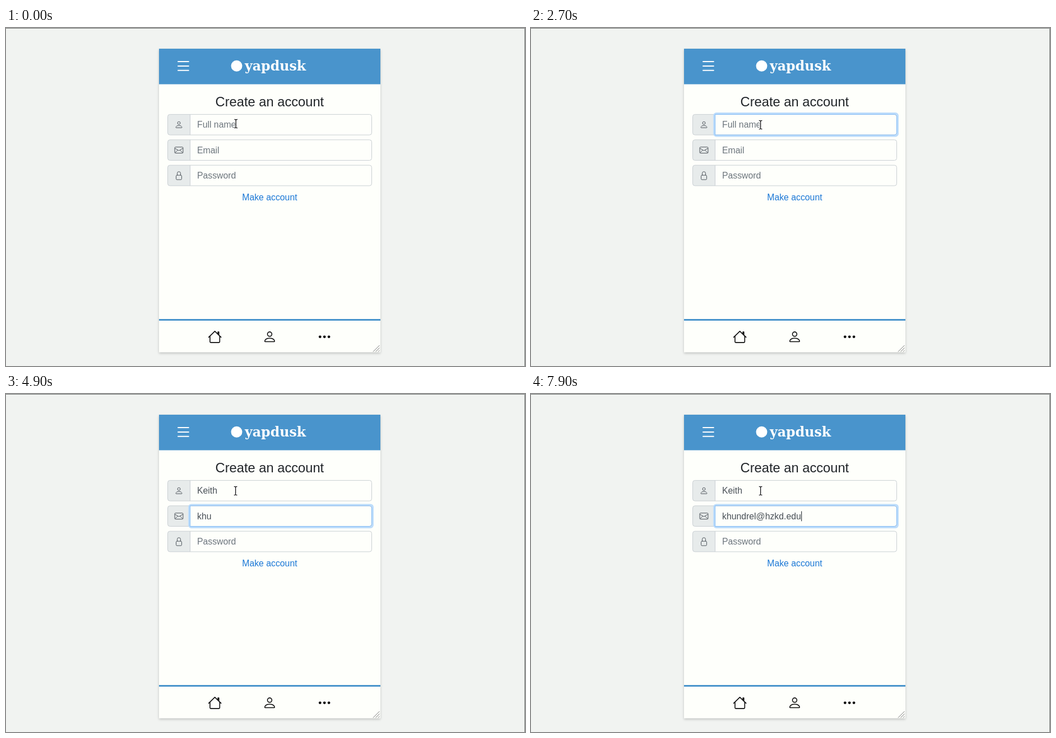
Animation, 926 px wide and 604 px high, one loop 8 s. Source, as an HTML page:

```html
<!DOCTYPE html>
<html lang="en">
<head>
<meta charset="utf-8">
<title>Create an account</title>
<style>
  html, body { margin: 0; width: 100%; height: 100%; overflow: hidden; background: #f1f3f1; }
  svg { display: block; }
  text { font: 15.8px "Liberation Sans", Arial, sans-serif; }
  .card { fill: #fefffb; filter: drop-shadow(0 2px 2px rgba(0, 0, 0, .2)); }
  .blue { fill: #4994cc; }
  .brand { font: bold 23.7px "DejaVu Serif", serif; fill: #fff; }
  .title { font-size: 23.7px; fill: #212529; }
  .link { fill: #1b78d6; }
  .mid { text-anchor: middle; }
  .line { fill: none; stroke-width: 1; stroke-linejoin: round; }
  .addon { fill: #e7ebeb; }
  .frame { fill: none; stroke: #c9cfd3; }
  .ring { fill: none; stroke: #bcdcfb; stroke-width: 3.2; }
  .edge { fill: none; stroke: #80b9f5; }
</style>
</head>
<body>
<svg width="926" height="604" viewBox="0 0 926 604">
  <defs>
    <g id="person" class="line">
      <circle cx="8" cy="5" r="2.5"/>
      <path d="M3 13.5h10q.5 0 .5-.5C13.5 12 12.5 9.5 8 9.5S2.5 12 2.5 13q0 .5 .5 .5z"/>
    </g>
    <g id="mail" class="line">
      <rect x=".5" y="2.5" width="15" height="11" rx="1.5"/>
      <path d="M.5 4.6L8 9l7.5-4.4M.9 12.8L6.2 8M15.1 12.8L9.8 8"/>
    </g>
    <g id="lock" class="line">
      <rect x="3" y="7.5" width="10" height="8" rx="1.5"/>
      <path d="M5 7.5V4a3 3 0 0 1 6 0v3.5"/>
    </g>
    <path id="beam" fill="none" d="M-2.8-7.7Q-.5-7.7 0-6.8Q.5-7.7 2.8-7.7M0-6.8V6.8M-2.8 7.7Q-.5 7.7 0 6.8Q.5 7.7 2.8 7.7"/>
  </defs>

  <rect width="926" height="604" fill="#f1f3f1"/>
  <path d="M0 .5H925.5V604" fill="none" stroke="#777a79"/>
  <rect class="card" x="273" y="37" width="395" height="542.5"/>
  <rect class="blue" x="273" y="37" width="395" height="63.5"/>
  <path d="M307 60h18.800M307 67.900h18.800M307 75.800h18.800" stroke="#fff" stroke-width="2" stroke-linecap="round"/>
  <circle cx="411.500" cy="67.800" r="10" fill="#fff"/>
  <text class="brand" x="426" y="75.500">yapdusk</text>
  <text class="title mid" x="470.400" y="139.800">Create an account</text>
  <g id="fields"></g>
  <text class="link mid" x="470.400" y="307.800">Make account</text>

  <rect class="blue" x="273" y="520" width="395" height="3"/>
  <g stroke="#0b0b0b">
    <g class="line" transform="translate(360 539.200) scale(1.58)">
      <path d="M2.500 7v6.500a1 1 0 0 0 1 1h9a1 1 0 0 0 1-1V7"/>
      <path d="M1 8.500L8 1.700L15 8.500" stroke-linecap="round"/>
      <path d="M11 2.500q0-.5 .5-.5h1q.5 0 .5 .5V6l-2-2z" fill="#0b0b0b" stroke="none"/>
    </g>
    <use href="#person" transform="translate(457.800 539.200) scale(1.58)"/>
  </g>
  <g fill="#0b0b0b">
    <circle cx="560.300" cy="551.800" r="2.400"/>
    <circle cx="568.200" cy="551.800" r="2.400"/>
    <circle cx="576.100" cy="551.800" r="2.400"/>
  </g>
  <path d="M655 578.500L666.500 567M659.500 578.500L666.500 571.500M664 578.500L666.500 576" stroke="#777" stroke-width="1"/>
  <g id="pointer">
    <use href="#beam" stroke="#fff" stroke-width="3"/>
    <use href="#beam" stroke="#111" stroke-width="1.300"/>
  </g>
</svg>
<script>
const LOOP = 8000;
const TEXT_X = 341;
const EMAIL = "khundrel@hzkd.edu";
const typed = (count, caret = "email") => ({ email: EMAIL.slice(0, count), caret });

// Each step changes only the listed parts of the state.
const steps = [
  [0, { x: 410.2, y: 171, name: "", email: "", nameGlow: 0, emailGlow: 0, caret: "" }],
  [200, { x: 416, y: 172 }],
  [300, { x: 420, y: 172.7 }],
  [1400, { x: 427 }],
  [1800, { x: 420 }],
  [1900, { x: 409.6, y: 173 }],
  [2100, { nameGlow: .5, caret: "name" }],
  [2200, { nameGlow: 1 }],
  [2700, { caret: "" }],
  [3000, { name: "K", caret: "name" }],
  [3100, { name: "Ke" }],
  [3200, { name: "Kei" }],
  [3400, { name: "Keit" }],
  [3500, { name: "Keith" }],
  [3700, { caret: "email" }],
  [3800, { nameGlow: .12, emailGlow: .85 }],
  [4000, { nameGlow: 0, emailGlow: 1 }],
  [4100, typed(1)],
  [4900, typed(3, "")],
  [5100, typed(5)],
  [5200, typed(6)],
  [5400, typed(7)],
  [5500, typed(8)],
  [6000, { caret: "" }],
  [6100, typed(9)],
  [6200, typed(10)],
  [6400, typed(11)],
  [6800, typed(12)],
  [7300, typed(13, "")],
  [7500, typed(14)],
  [7700, typed(15)],
  [7800, typed(16)],
  [7900, typed(17)]
];

function makeField(icon, hint, y) {
  const group = document.createElementNS("http://www.w3.org/2000/svg", "g");
  const right = "H648.5q4 0 4 4v28.700q0 4-4 4H328.500z";
  group.setAttribute("transform", `translate(0 ${y})`);
  group.innerHTML = `
    <path class="addon" d="M328.500 0H292.500q-4 0-4 4v28.700q0 4 4 4h36z"/>
    <rect class="frame" x="288.500" width="364" height="36.700" rx="4"/>
    <path class="frame" d="M328.500 0v36.700"/>
    <g class="glow" opacity="0">
      <rect class="ring" x="326.700" y="-1.800" width="327.600" height="40.300" rx="4"/>
      <path class="edge" d="M328.500 0${right}"/>
    </g>
    <use href="#${icon}" stroke="#495057" transform="translate(300.600 10.500) scale(.987)"/>
    <text x="${TEXT_X}" y="24">${hint}</text>
    <rect class="caret" y="9.700" width="1.200" height="17.800" fill="#343a40"/>`;
  document.getElementById("fields").append(group);
  const [glow, label, caret] = [".glow", "text", ".caret"].map(s => group.querySelector(s));

  return (value, focus, caretOn) => {
    label.textContent = value || hint;
    label.style.fill = value ? "#495057" : "#6c757d";
    glow.setAttribute("opacity", focus);
    const width = value ? label.getComputedTextLength() : 0;
    caret.setAttribute("x", TEXT_X + .3 + width);
    caret.style.visibility = caretOn ? "visible" : "hidden";
  };
}

const drawName = makeField("person", "Full name", 154.4);
const drawEmail = makeField("mail", "Email", 199.8);
const drawPassword = makeField("lock", "Password", 245.2);
const pointer = document.getElementById("pointer");
drawPassword("", 0, false);

let shown = -1;
function render(time) {
  const count = steps.filter(([start]) => start <= time).length;
  if (count === shown) return;
  shown = count;
  const s = Object.assign({}, ...steps.slice(0, count).map(step => step[1]));
  drawName(s.name, s.nameGlow, s.caret === "name");
  drawEmail(s.email, s.emailGlow, s.caret === "email");
  pointer.setAttribute("transform", `translate(${s.x} ${s.y})`);
}

const begin = performance.now();
function tick() {
  render((performance.now() - begin) % LOOP);
  requestAnimationFrame(tick);
}
tick();
</script>
</body>
</html>
```
